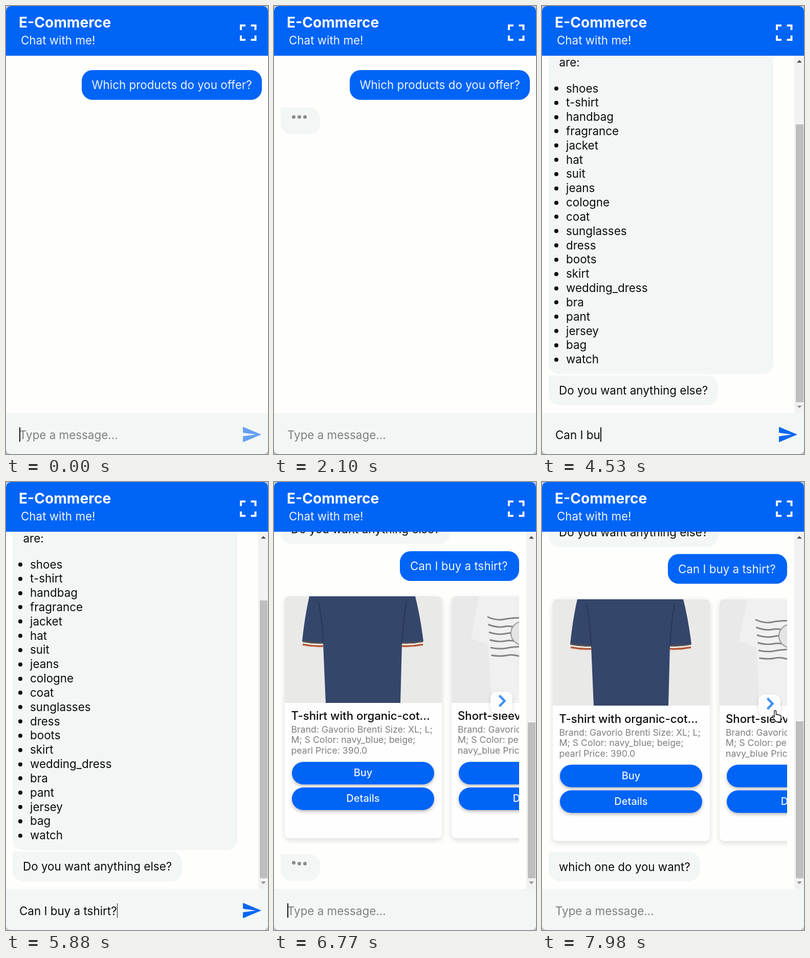
An HTML page that plays this animation: 512 px wide and 874 px high, repeating every 8000 ms.

```html
<!DOCTYPE html>
<html lang="en">
<head>
<meta charset="utf-8">
<title>Shop chat</title>
<style>
  :root { --blue: #0064f7; --pale: #f2f6f5; }
  html, body { margin: 0; width: 100%; height: 100%; overflow: hidden; background: #c4c6c8; }
  .stage { position: relative; width: 512px; height: 874px; overflow: hidden; border-radius: 10px;
    background: #fefefd; font: 22.4px/28px Inter, sans-serif; color: #0b0d0d; }
  .stage div, .stage svg { position: absolute; white-space: pre; box-sizing: border-box; }
  .head { left: 0; top: 0; width: 512px; height: 97px; background: var(--blue); color: #fff; }
  .head b { position: absolute; left: 25px; top: 18px; font-size: 28.1px; }
  .head span { position: absolute; left: 29px; top: 53px; color: #eef5ff; }
  .view { left: 0; top: 97px; width: 512px; height: 697px; overflow: hidden; }
  .log { left: 0; top: -97px; width: 494px; height: 0; }
  .bot, .user { height: 57.5px; padding: 0 20px; line-height: 57.5px; }
  .bot { left: 13px; background: var(--pale); border-radius: 0 21px 21px 21px; }
  .user { background: var(--blue); color: #eef5ff; border-radius: 21px; height: 58px; line-height: 58px; }
  .bot.list { top: 52px; width: 438.5px; height: 666px; line-height: 28px; }
  .li { left: 34px; }
  .li::before { content: ""; position: absolute; left: -23px; top: 10.5px; width: 8px; height: 8px;
    border-radius: 50%; background: #0b0d0d; }
  .typing { left: 13px; width: 76.5px; height: 52px; background: var(--pale); border-radius: 0 21px 21px 21px; }
  .typing div { top: 14.8px; width: 7.6px; height: 7.6px; border-radius: 50%; background: #898d8c; }
  .cards { left: 13px; top: 868px; width: 466px; height: 500px; overflow: hidden; }
  .card { top: 12.5px; width: 307px; height: 472px; border-radius: 9px; background: #fefefe;
    box-shadow: 0 4px 11px #0002; }
  .pic { left: 0; top: 0; border-radius: 9px 9px 0 0; }
  .name { left: 12.5px; top: 219px; font-weight: 500; font-size: 22.2px; }
  .info { left: 12.5px; top: 250px; font-size: 17.7px; line-height: 20.9px; color: #7d7f80; }
  .btn { left: 14px; width: 278px; height: 43.5px; border-radius: 22px; background: var(--blue); color: #eef5ff;
    text-align: center; font-weight: 500; font-size: 20px; line-height: 43px; box-shadow: 0 3px 6px #0004; }
  .next { left: 423px; top: 1067px; width: 43px; height: 43px; border-radius: 12px; background: #fefefe;
    box-shadow: 0 2px 7px #0002; }
  .bar { left: 493px; top: 97px; width: 19px; height: 697px; background: #f2f2f2; }
  .thumb { left: 496px; width: 15px; background: #bebebe; }
  .foot { left: 0; top: 794px; width: 512px; height: 80px; background: var(--pale); }
  .hint { left: 26px; top: 29px; color: #7c8080; }
  .text { left: 26px; top: 29px; }
  .caret { display: inline-block; width: 1.8px; height: 28px; margin: -1px 0 0; vertical-align: top; background: #111; }
</style>
</head>
<body>
<div class="stage">
  <div class="view">
    <div class="log" id="log">
      <div class="bot list" id="list"></div>
      <div class="bot" id="more" style="top:721px;width:331px">Do you want anything else?</div>
      <div class="user" id="ask" style="left:246px;top:793px;width:232.5px">Can I buy a tshirt?</div>
      <div class="cards" id="cards"></div>
      <div class="next" id="next"><svg width="43" height="43"><path d="M17.5 7.5 27.5 18 17.5 28.5" fill="none" stroke="#438ff3" stroke-width="4.6"/></svg></div>
      <div class="bot" id="which" style="top:1373.5px;width:296px">which one do you want?</div>
    </div>
    <div class="user" id="first" style="left:147.5px;top:28px;width:352px">Which products do you offer?</div>
    <div class="typing" id="typing"><div></div><div></div><div></div></div>
  </div>
  <div id="scroll">
    <div class="bar"></div>
    <div class="thumb" id="thumb"></div>
    <svg style="left:493px;top:97px" width="19" height="697">
      <path d="M5 13.5h10l-5-5z" fill="#4a4a4a"/><path d="M5 682.5h10l-5 5z" fill="#909090"/>
    </svg>
  </div>
  <div class="head">
    <b>E-Commerce</b><span>Chat with me!</span>
    <svg style="left:457px;top:36px" width="33" height="33">
      <path d="M2 11V2h9M21.500 2h9v9M30.500 21.500v8.500h-9M11 30H2v-8.500" fill="none" stroke="#f2f7ff" stroke-width="4"/>
    </svg>
  </div>
  <div class="foot">
    <div class="hint" id="hint">Type a message...</div>
    <div class="text"><span id="typed"></span><span class="caret" id="caret"></span></div>
    <svg id="send" style="left:462px;top:26px" width="38" height="32">
      <path d="M1 1 37 16 1 31V19.500L26 16 1 12.500z" fill="#0866f2"/>
    </svg>
  </div>
  <svg id="pointer" width="24" height="28" stroke="#222" stroke-width="1.5" stroke-linejoin="round" fill="#fff">
    <path id="arrow" d="M2 2v18l4.500-4 3 7 3-1.300-3-6.700h6z"/>
    <path id="hand" d="M5 3.500c0-2.500 3.500-2.500 3.500 0V10c1-1.300 3-1 3.300.5 1-1 3-.6 3.200.8 1.200-.8 3 0 3 1.700V18c0 2-1.500 3-1.500 6H8c0-3-4.500-5.500-6.500-9.500-.8-2 1.200-2.800 2.300-1.500L5 14.500z"/>
  </svg>
</div>
<script>
const $ = id => document.getElementById(id);
const show = (el, on) => { el.style.visibility = on ? 'visible' : 'hidden'; };
const clamp = (v, a = 0, b = 1) => Math.min(b, Math.max(a, v));

const LOOP = 8000, SENT = 6015;
const products = ('shoes t-shirt handbag fragrance jacket hat suit jeans cologne coat sunglasses ' +
  'dress boots skirt wedding_dress bra pant jersey bag watch').split(' ');
$('list').innerHTML = '<div style="top:44px;left:20.5px">are:</div>' +
  products.map((p, i) => `<div class="li" style="top:${94.5 + 27.83 * i}px">${p}</div>`).join('');

const band = (color, dy, width) =>
  `<path d="M35 ${88 + dy}Q55 ${92 + dy} 75 ${91 + dy}M229 ${91 + dy}Q250 ${92 + dy} 270 ${88 + dy}" stroke="${color}" stroke-width="${width}" fill="none"/>`;
const navyTee = '<rect width="307" height="208" fill="#e9e9e8"/>' +
  '<path d="M48 0H255Q265 40 271 88Q250 94 229 91L226 208H80L75 91Q55 94 34 88Q39 40 48 0z" fill="#35466b"/>' +
  '<path d="M66 10Q74 50 75 94M238 10Q231 50 229 94" fill="none" stroke="#28375a" stroke-width="2"/>' +
  band('#55514f', 0, 3) + band('#f0ede5', 3, 3) + band('#b5563a', 6, 3.5) + band('#e8e2d8', 9, 2);

let stripes = '';
for (let i = 0; i < 6; i++) {
  const y = 40 + i * 15;
  stripes += `<path d="M${70 + i * 1.5} ${y}q18 ${8 - i} 32 ${5 - i}t40 ${i % 2 ? 8 : -3}"/>`;
}
const stripedTee = '<rect width="307" height="208" fill="#e9e9e9"/>' +
  '<path d="M54 0H250L240 95 230 208H78L72 95 38 82z" fill="#f0f0f0"/>' +
  `<g fill="none" stroke="#858585" stroke-width="3">${stripes}</g>` +
  '<circle cx="139" cy="72" r="23" fill="#e4e4e4" stroke="#999" stroke-width="2"/>';

const card = (x, pic, name, info) => `<div class="card" style="left:${x}px">
<svg class="pic" width="307" height="208">${pic}</svg><div class="name">${name}</div><div class="info">${info}</div>
<div class="btn" style="top:323.5px">Buy</div><div class="btn" style="top:373.5px">Details</div></div>`;
$('cards').innerHTML =
  card(8, navyTee, 'T-shirt with organic-cot...',
    'Brand: Gavorio Brenti Size: XL; L;\nM; S Color: navy_blue; beige;\npearl Price: 390.0') +
  card(333.5, stripedTee, 'Short-sleeved T-shirt...',
    'Brand: Gavorio Brenti Size: XL; L;\nM; S Color: pearl; beige;\nnavy_blue Price: 450.0');

const message = 'Can I buy a tshirt?';
const keys = [3215, 3725, 3780, 3825, 4245, 4285, 4425, 4520, 4610, 4705, 4845, 4945,
  5125, 5200, 5265, 5405, 5455, 5595, 5875];
const caretResets = [-150, ...keys, SENT, 6685, 7235];

// start, scroll offset, top of the typing bubble (0 = none)
const steps = [[0, 0, 0], [45, 0, 198], [2145, 5.5, 726], [2695, 0, 0], [SENT, 73, 0],
  [6050, 139, 726], [6685, 658, 726], [7235, 652.5, 0]];

const wave = p => p < 0.3 ? p / 0.3 : p < 0.6 ? (0.6 - p) / 0.3 : 0;
const PERIOD = 1100, LAG = 110;

function drawDots(age) {
  [...$('typing').children].forEach((dot, i) => {
    const p = ((age - i * LAG + PERIOD) % PERIOD) / PERIOD;
    dot.style.left = 21.7 + i * 11 + 'px';
    dot.style.transform = `translateY(${-7 * wave(p)}px)`;
  });
}

function drawPointer(t) {
  const k = clamp((t - 7500) / 440), e = 1 - (1 - k) ** 2;
  const x = 4 + 445 * e, y = 640 - 196 * e;
  $('pointer').style.transform = `translate(${x}px,${y}px)`;
  show($('arrow'), t >= 7505 && x <= 425);
  show($('hand'), t >= 7505 && x > 425);
}

function render(t) {
  const [start, offset, dotsTop] = steps.findLast(s => s[0] <= t);
  $('log').style.transform = `translateY(${-offset}px)`;
  show($('first'), t < 2145);
  show($('list'), t >= 2145);
  show($('more'), t >= 2695);
  show($('ask'), t >= SENT);
  show($('cards'), t >= 6685);
  show($('next'), t >= 6685);
  show($('which'), t >= 7235);

  show($('typing'), dotsTop);
  $('typing').style.top = dotsTop - 97 + 'px';
  drawDots(t - start);

  $('scroll').style.display = t >= 2145 ? '' : 'none';
  const length = 456576 / (842 + offset);
  $('thumb').style.top = 773 - length + 'px';
  $('thumb').style.height = length + 'px';

  const count = t < SENT ? keys.filter(k => k <= t).length : 0;
  $('typed').textContent = message.slice(0, count);
  show($('hint'), !count);
  const idle = t - caretResets.findLast(r => r <= t);
  show($('caret'), idle % 1200 < 600);

  $('send').style.opacity = t < 3000 ? clamp(0.6 - t / 250)
    : t < SENT ? clamp((t - 3225) / 230) : clamp(1 - (t - SENT) / 250);
  drawPointer(t);
}

const begin = performance.now();
function tick() {
  render((performance.now() - begin) % LOOP);
  requestAnimationFrame(tick);
}
tick();
</script>
</body>
</html>
```
